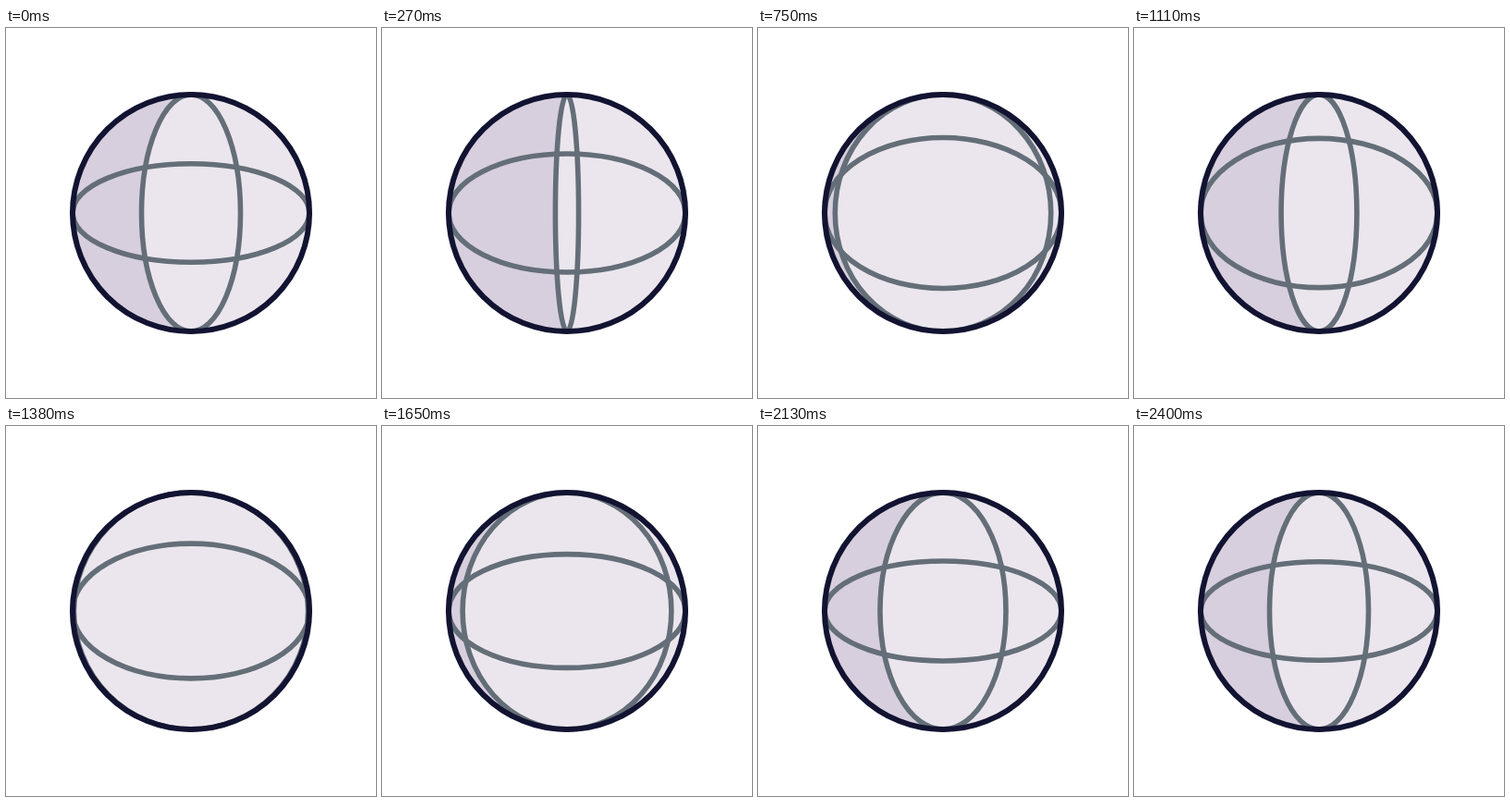
Recreate the animation shown at these times as an HTML page without scripts. Size 400 by 400 pixels, loop 4.46 s.

```html
<!DOCTYPE html>
<html lang="en">
<head>
<meta charset="utf-8">
<title>Spinning globe</title>
<style>
  @property --spin {
    syntax: "<angle>";
    inherits: false;
    initial-value: 24.7deg;
  }
  html, body {
    margin: 0;
    width: 100%;
    height: 100%;
    overflow: hidden;
    background: #fff;
  }
  svg {
    display: block;
    width: 100%;
    height: 100%;
  }
  .light { fill: #ebe6ed; }
  .shade { fill: #d7cfdd; }
  .line { stroke: #646e78; stroke-width: 5.6; }
  .rim { fill: none; stroke: #121331; stroke-width: 6; }

  /* The width of the meridian follows the angle of the globe. */
  .meridian {
    rx: calc(128px * max(sin(var(--spin)), -1 * sin(var(--spin))));
    ry: 128px;
    animation: spin 4460ms infinite;
  }
  .parallel {
    fill: none;
    rx: 128px;
    ry: 53.3px;
    animation: tilt 4460ms infinite;
  }

  @keyframes spin {
    0% { --spin: 24.7deg; animation-timing-function: cubic-bezier(.333, 0, .667, .238); }
    6.054% { --spin: 5.8deg; animation-timing-function: cubic-bezier(.333, .214, .667, .666); }
    16.816% { --spin: -114deg; animation-timing-function: cubic-bezier(.333, .355, .667, .666); }
    24.888% { --spin: -198.4deg; animation-timing-function: cubic-bezier(.333, .336, .667, .728); }
    30.942% { --spin: -261.3deg; animation-timing-function: cubic-bezier(.333, .618, .667, .821); }
    43.049% { --spin: -316.6deg; animation-timing-function: cubic-bezier(.333, .47, .667, 1); }
    53.812%, 100% { --spin: -335.3deg; }
  }
  @keyframes tilt {
    0% { ry: 53.3px; animation-timing-function: cubic-bezier(.28, 0, .4, 1); }
    19.507% { ry: 82px; animation-timing-function: cubic-bezier(.47, 0, .28, 1); }
    53.812%, 100% { ry: 53.3px; }
  }
</style>
</head>
<body>
<svg viewBox="0 0 400 400">
  <circle class="light" cx="200" cy="200" r="128"/>
  <path class="shade" d="M200 72a128 128 0 0 0 0 256z"/>
  <ellipse class="meridian light line" cx="200" cy="200" rx="53.5" ry="128"/>
  <ellipse class="parallel line" cx="200" cy="200" rx="128" ry="53.3"/>
  <circle class="rim" cx="200" cy="200" r="128"/>
</svg>
</body>
</html>
```
